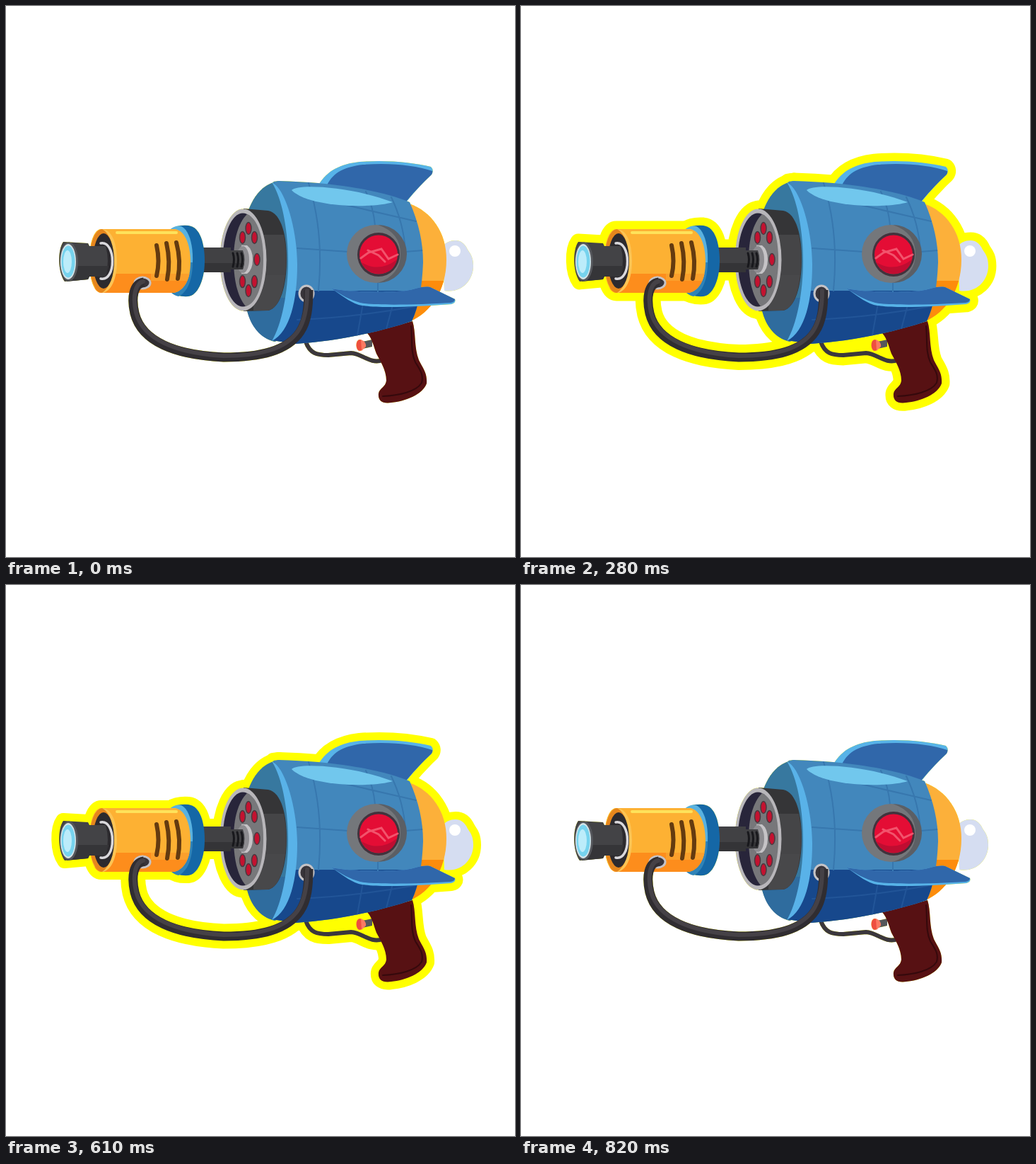
These frames come from a looping animation (720 by 778 pixels, 0.89 s). An HTML page:

```html
<!DOCTYPE html>
<html lang="en">
<head>
<meta charset="utf-8">
<title>Ray gun</title>
<style>
html, body { margin: 0; width: 100%; height: 100%; overflow: hidden; background: #fff; }
svg { display: block; width: 100%; height: 100%; }
#glow * { fill: #ff0; stroke: #ff0; stroke-linejoin: round; stroke-linecap: round; }
#glow .wire, .wire, .line { fill: none; }
.line { stroke-linecap: round; }
</style>
</head>
<body>
<svg viewBox="0 0 720 778">
<defs>
  <clipPath id="hull"><path d="M386 247C470 249 535 262 571 277Q590 320 590 362Q588 416 574 445C520 463 460 474 410 477L376 472C396 450 402 400 402 360C402 315 394 272 378 248Z"/></clipPath>
  <clipPath id="tank"><path d="M135 315H240C255 319 261 340 261 362C261 386 252 402 238 405H135C112 405 112 315 135 315Z"/></clipPath>
  <clipPath id="dome"><path d="M570 279C602 290 623 320 623 358C623 402 600 433 572 445Z"/></clipPath>
</defs>
<g id="glow"></g>
<g id="gun">
  <!-- bulb and rear dome -->
  <path class="s" fill="#d5ddf1" d="M620 402C645 406 661 387 661 367C661 353 656 349 653 344C649 335 643 331 636 331C628 331 622 334 618 339Z"/>
  <circle cx="635" cy="346" r="8" fill="#fff"/>
  <path class="s" fill="#fcb03a" d="M570 279C602 290 623 320 623 358C623 402 600 433 572 445Z"/>
  <path clip-path="url(#dome)" fill="#fd8c0c" d="M570 388H630V450H570Z"/>

  <!-- upper fin -->
  <path class="s" fill="#57b3e8" d="M442 253C454 232 474 223 500 220C540 217 575 221 601 227Q606 232 602 238C590 249 578 262 566 277Z"/>
  <path fill="#3067aa" d="M454 253C463 234 480 227 505 224C545 221 578 225 603 233Q604 236 601 239C589 250 578 262 566 276Z"/>

  <!-- small wire, trigger, grip -->
  <path class="s wire" data-c="6" stroke="#3b373d" stroke-width="6" d="M424 474C430 491 440 493 456 493L488 490C505 491 514 506 533 500"/>
  <path class="s" fill="#55575b" d="M504 474L518 471V481L504 484Z"/>
  <ellipse class="s" cx="500.500" cy="479" rx="5" ry="8" fill="#ee4f3f"/>
  <path fill="#fb7a62" d="M502 471Q510 474 509 481L503 487Z"/>
  <path class="s" fill="#571113" d="M511 462L575 445C580 460 577 482 584 500C590 512 596 518 595 533C589 549 565 558 545 560C531 562 526 556 527 547C528 540 537 538 538 529C538 515 530 502 524 491C520 480 518 470 511 462Z"/>
  <path class="line" stroke="#35090c" stroke-width="2" d="M573 452C575 470 572 488 579 503C586 514 591 521 588 532C580 545 555 550 533 551"/>

  <!-- hull -->
  <path class="s" fill="#37789f" d="M386 247C362 251 350 270 343 288C334 325 335 395 341 430C347 452 360 469 380 474L420 460V260Z"/>
  <path fill="#2f6c9e" d="M338 412L401 412C398 440 390 463 378 473C360 469 346 452 341 430Z"/>
  <path class="s" fill="#4287bc" d="M386 247C470 249 535 262 571 277Q590 320 590 362Q588 416 574 445C520 463 460 474 410 477L376 472C396 450 402 400 402 360C402 315 394 272 378 248Z"/>
  <g clip-path="url(#hull)">
    <path fill="#17488c" d="M380 412L411 402H590V480H370Z"/>
    <g class="line" stroke="#3777ae" stroke-width="2">
      <path d="M428 250Q450 320 442 402M509 262Q520 285 522 310M545 270Q562 305 565 345M412 342L484 347M565 347L590 345M526 390V404M411 265L580 304"/>
      <path stroke="#225598" d="M505 420L497 465M547 422L538 456M412 443Q490 440 580 424"/>
    </g>
    <path fill="#71c7ed" d="M404 260C412 251 486 254 547 277C520 286 428 285 404 260Z"/>
  </g>
  <path fill="#59b2e8" d="M376 249C396 258 412 318 412 365C412 415 402 460 376 473C390 450 399 405 399 360C399 318 391 272 376 249Z"/>

  <!-- lower fin -->
  <path class="s" fill="#57b3e8" d="M460 399C485 404 540 405 565 402C580 400 588 395 600 397L635 414Q637 419 630 421C580 425 520 427 499 422C484 417 475 408 460 399Z"/>
  <path fill="#3067aa" d="M460 399C485 404 540 405 565 402C580 400 588 395 600 397L635 414Q635 418 629 419C580 422 520 423 501 419C486 415 475 408 460 399Z"/>

  <!-- porthole -->
  <ellipse cx="523.500" cy="350" rx="41.500" ry="41" fill="#74777b"/>
  <path fill="#5b5f65" d="M526 309A41 41 0 0 1 526 391Q558 380 558 350Q558 320 526 309Z"/>
  <ellipse cx="527" cy="351" rx="30" ry="31" fill="#42333d"/>
  <ellipse cx="527" cy="351" rx="27" ry="27.500" fill="#e40d35"/>
  <path fill="#bf0d31" d="M503 362Q528 377 553 358Q548 378 527 378Q509 377 503 362Z"/>
  <path class="line" stroke="#f2536c" stroke-width="3" d="M502 356L513 348L531 343L541 357L554 351M512 345L527 352L536 361"/>

  <!-- emitter disc -->
  <path class="s" fill="#353537" d="M336 286L371 289C390 293 397 325 397 358C397 395 388 426 371 430L336 431Z"/>
  <path fill="#454547" d="M350 323H393Q399 355 395 380H350Z"/>
  <path fill="#48484a" d="M350 380H395Q390 425 371 430H350Z"/>
  <ellipse class="s" cx="335.500" cy="358.500" rx="33" ry="72" fill="#b8b6ba"/>
  <ellipse cx="335" cy="358.500" rx="28.500" ry="66" fill="#28253a"/>
  <path fill="#77777a" d="M341 294C356 300 364 326 364 358C364 393 355 420 339 424C327 410 322 385 322 358C322 330 328 307 341 294Z"/>
  <g id="holes" fill="#c31230" stroke="#493a40" stroke-width="1.500"></g>

  <!-- shaft -->
  <path fill="#c5c3c6" d="M333 338H341Q349 344 349 358T341 378H333Z"/>
  <ellipse cx="335" cy="358" rx="9" ry="19" fill="#8d8c90"/>
  <path class="s" fill="#414144" d="M270 341H318V345H335Q340 358 335 372H318V376H270Z"/>
  <path fill="#343437" d="M270 363H337L335 372H318V376H270Z"/>
  <path class="line" stroke="#18181c" stroke-width="3" d="M321 349Q324 358 321 368M327 349Q330 358 327 368M333 349Q336 358 333 368"/>

  <!-- blue collar and tank -->
  <path class="s" fill="#1567a6" d="M233 315Q242 309 258 310C275 312 281 336 281 360C281 389 270 409 258 410Q242 411 233 404Z"/>
  <path fill="#59b2e0" d="M233 315Q240 309 248 311C260 317 265 340 264 362H258Z"/>
  <path fill="#2f83b8" d="M258 362H264C264 387 256 405 244 410Q238 409 233 404Z"/>
  <path class="s" fill="#fdb133" d="M135 315H240C255 319 261 340 261 362C261 386 252 402 238 405H135C112 405 112 315 135 315Z"/>
  <g clip-path="url(#tank)">
    <path fill="#fd8d1c" d="M135 378H270V410H120Z"/>
    <path fill="#fba02c" d="M205 378H270V388H205Z"/>
    <ellipse cx="136" cy="360" rx="18" ry="45" fill="#e5861d"/>
    <path fill="#fdc454" d="M136 315C150 316 157 335 157 360C157 387 148 404 136 405Q152 394 152 360Q152 324 136 315Z"/>
  </g>
  <ellipse cx="138" cy="360" rx="15" ry="39" fill="#2c2a2e"/>
  <path class="line" stroke="#d9d8dc" stroke-width="3.500" d="M134 335C156 331 156 390 134 385"/>
  <path class="line" stroke="#fee25a" stroke-width="4" d="M157 320H241"/>
  <path class="line" stroke="#643b10" stroke-width="6" d="M213 338Q218 360 213 381M227 335Q233 361 228 386M241 334Q248 360 243 385"/>

  <!-- nozzle -->
  <path class="s" fill="#434346" d="M81 333L116 335L118 339H141Q147 360 141 382H118L116 386L83 389C73 375 73 344 81 333Z"/>
  <path fill="#353538" d="M98 367H145L141 382H118L116 386L86 389Z"/>
  <ellipse cx="89" cy="361" rx="13" ry="27.500" fill="#55575c"/>
  <ellipse cx="88" cy="361" rx="11" ry="25" fill="#d5e4e8"/>
  <ellipse cx="88" cy="361" rx="9.500" ry="22.500" fill="#76d3ee"/>
  <ellipse cx="87" cy="361" rx="6" ry="16" fill="#bcecfa"/>

  <!-- hose -->
  <ellipse cx="193" cy="391" rx="11" ry="8" fill="#38343a" stroke="#c5c3c6" stroke-width="3"/>
  <ellipse cx="425" cy="406" rx="10" ry="11" fill="#38343a" stroke="#c5c3c6" stroke-width="3"/>
  <path class="s wire" data-c="13" stroke="#302d31" stroke-width="13" d="M195 390C180 392 177 412 182 434C192 474 240 493 308 496C360 496 398 487 416 460C426 445 428 425 428 401"/>
  <path class="line" stroke="#454146" stroke-width="6" d="M194 389C182 392 179 412 184 433C194 471 241 490 308 494C358 494 395 485 413 459C423 444 426 425 426 402"/>
</g>
</svg>
<script>
const NS = 'http://www.w3.org/2000/svg';
const glow = document.getElementById('glow');
const holes = document.getElementById('holes');

for (let i = 0; i < 8; i++) {
  const angle = i * Math.PI / 4;
  const hole = document.createElementNS(NS, 'ellipse');
  const shape = { cx: 343 + 12 * Math.cos(angle), cy: 358 + 44 * Math.sin(angle), rx: 4, ry: 8.5 };
  for (const key in shape) hole.setAttribute(key, shape[key]);
  holes.append(hole);
}

const outlines = [...document.querySelectorAll('#gun .s')].map(part => {
  const copy = part.cloneNode();
  glow.append(copy);
  return copy;
});

// Outline thickness eases steeply in, holds, then eases out: [start in ms, px]
const LOOP = 890;
const steps = [[0, 0], [70, 0], [140, .15], [210, 5.7], [280, 11.4], [350, 12.2],
  [540, 12], [610, 11], [680, .15], [750, 0], [820, 0]];

function draw(now) {
  const t = now % LOOP;
  const width = steps.findLast(([start]) => start <= t)[1];
  for (const part of outlines) {
    part.style.strokeWidth = (+part.dataset.c || 0) + 2 * width;
  }
  requestAnimationFrame(() => draw(performance.now()));
}
draw(performance.now());
</script>
</body>
</html>
```
